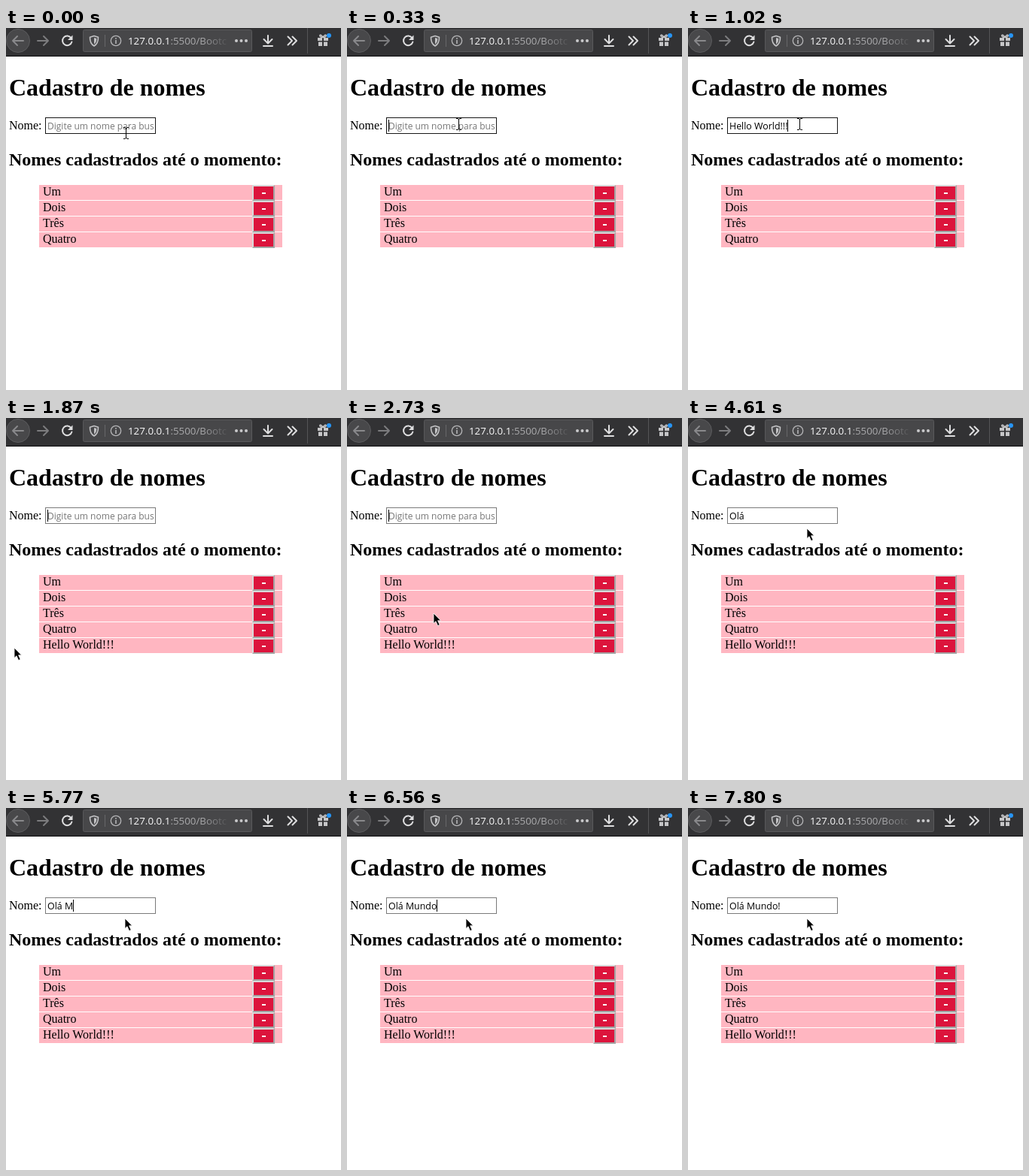
An HTML page that plays this animation: 445x482 px, repeating every 8 s.

```html
<!DOCTYPE html>
<html lang="pt">
<head>
<meta charset="utf-8">
<style>
  html, body { margin: 0; width: 100%; height: 100%; overflow: hidden; background: #fff; }
  svg { display: block; width: 445px; height: 482px; }
  text { white-space: pre; }
  .page { font-family: "Liberation Serif", "Times New Roman", serif; font-size: 16px; }
  .ui { font-family: "Open Sans", "Noto Sans", sans-serif; }
  .line { fill: none; stroke-width: 2; stroke-linecap: round; stroke-linejoin: round; }
</style>
</head>
<body>
<svg viewBox="0 0 445 482">
  <defs>
    <linearGradient id="fade" gradientUnits="userSpaceOnUse" x1="262" x2="297" y1="0" y2="0">
      <stop stop-color="#a9a9ab"/><stop offset="1" stop-color="#a9a9ab" stop-opacity="0"/>
    </linearGradient>
    <clipPath id="field"><rect x="55" y="121" width="142" height="18"/></clipPath>
  </defs>
  <rect width="445" height="482" fill="#fff"/>

  <g id="toolbar">
    <rect width="445" height="38" fill="#323234"/>
    <rect y="37" width="445" height="1" fill="#0c0c0d"/>
    <circle cx="16" cy="17" r="15.5" fill="#48484a" stroke="#5b5b5d"/>
    <path class="line" stroke="#89898b" d="M23 17H9M15 11L9 17L15 23"/>
    <path class="line" stroke="#7c7c7e" d="M42 17H56M50 11L56 17L50 23"/>
    <path class="line" stroke="#dededf" d="M86.5 13.2A6.3 6.3 0 1 0 87.4 18.5"/>
    <path fill="#dededf" d="M88.5 9.5V16H82Z"/>
    <rect x="102.5" y="2.5" width="224" height="29" rx="2" fill="#474749" stroke="#59595b"/>
    <path class="line" stroke="#c3c3c5" style="stroke-width:1.6" d="M117 10.5L122.5 12.3C122.6 18 121 21.8 117 24C113 21.8 111.4 18 111.5 12.3Z"/>
    <path fill="#c3c3c5" d="M117 13L120.3 14C120.2 18 119.2 20 117 21.5Z"/>
    <rect x="131" y="9" width="1" height="16" fill="#68686a"/>
    <circle class="line" cx="146" cy="17" r="6.7" stroke="#b5b5b7" style="stroke-width:1.3"/>
    <path fill="#b5b5b7" d="M145.2 13h1.6v1.7h-1.6zM145.2 16h1.6v5h-1.6z"/>
    <g class="ui" font-size="13.33">
      <text x="162" y="22" fill="#f9f9fa">127.0.0.1</text>
      <text x="218.4" y="22" fill="url(#fade)">:5500/Bootc</text>
    </g>
    <g fill="#c9c9cb"><circle cx="306" cy="17" r="2"/><circle cx="312.5" cy="17" r="2"/><circle cx="319" cy="17" r="2"/></g>
    <g class="line" stroke="#dededf">
      <path d="M348 10V20M342.5 15L348 20.5L353.5 15M342 24H354"/>
      <path d="M374.5 11.5L380 17L374.5 22.5M380.5 11.5L386 17L380.5 22.5"/>
    </g>
    <rect x="400" y="0" width="1" height="34" fill="#545456"/>
    <g fill="#c6c6c8">
      <path d="M414 13h6v4h-6zM422 13h6v4h-6zM415 18.5h5V24h-5zM422 18.5h5V24h-5z"/>
      <path class="line" stroke="#c6c6c8" d="M420.5 12.5C416 12 416 8.5 418.5 9.5L421 12L423.5 9.5C426 8.5 426 12 421.5 12.5" style="stroke-width:1.5"/>
    </g>
    <circle cx="429" cy="10" r="3" fill="#2795f5"/>
  </g>

  <g class="page">
    <text x="4" y="90" font-size="32" font-weight="bold">Cadastro de nomes</text>
    <text x="4" y="135">Nome:</text>
    <text x="4" y="183" font-size="24" font-weight="bold">Nomes cadastrados até o momento:</text>
    <g id="list"></g>
  </g>

  <rect id="border" x="52.5" y="119.5" width="146" height="21" fill="#fff"/>
  <g class="ui" clip-path="url(#field)">
    <text id="hint" x="55" y="135" font-size="12" fill="#767676">Digite um nome para bus</text>
    <text id="typed" x="55" y="135" font-size="12.4"></text>
  </g>
  <rect id="caret" y="122" width="1" height="16"/>

  <path id="beam" class="line" stroke="#000" style="stroke-width:1;stroke-linecap:butt"
        d="M-3 -7.5H-1L.5 -6.5L2 -7.5H4M.5 -7V7M-3 7.5H-1L.5 6.5L2 7.5H4"/>
  <path id="arrow" stroke="#fff" stroke-width=".8"
        d="M0 0V13.5L3 10.7L5.6 16.6L8.2 15.4L5.6 9.8H9.6Z"/>
</svg>
<script>
const LOOP = 8000;
const ADDED_AT = 1100;
const $ = id => document.getElementById(id);

// [time, field text, caret visible]
const typing = [
  [0, "", false], [330, "", true], [480, "H", true], [640, "Hello ", true],
  [720, "Hello World", false], [950, "Hello World!", true], [1020, "Hello World!!!", true],
  [ADDED_AT, "", true], [2960, "Hello World!!!", true], [3120, "Hello World!!!", false],
  [3270, "Hello World!!", true], [3510, "Hello World!", true], [3670, "Hello World", true],
  [3900, "Hello ", true], [3980, "", true],
  [4370, "O", true], [4450, "Ol", true], [4610, "Olá", false], [4910, "Olá ", true],
  [5070, "Olá m", false], [5150, "Olá m", true], [5540, "Olá ", true],
  [5700, "Olá M", false], [5770, "Olá M", true], [5930, "Olá Mu", true],
  [6090, "Olá Mun", true], [6170, "Olá Mund", false], [6250, "Olá Mund", true],
  [6560, "Olá Mundo", true], [6800, "Olá Mundo", false], [7260, "Olá Mundo", true],
  [7480, "Olá Mundo!", true], [7800, "Olá Mundo!", false]
];

// [time, x, y] of the pointer hotspot
const pointer = [
  [0, 159, 140], [80, 157, 130], [160, 152, 114], [240, 148, 126], [330, 148, 128],
  [1560, 138, 150], [1640, 95, 215], [1720, 45, 275], [1790, 18, 302], [1870, 11, 306],
  [1950, 4, 309], [2030, 1, 309], [2110, 40, 306], [2190, 80, 303], [2270, 100, 302],
  [2730, 115, 260], [2810, 142, 195], [2880, 158, 147]
];

const at = (steps, t) => steps.findLast(step => step[0] <= t);
const show = (id, on) => $(id).setAttribute("visibility", on ? "visible" : "hidden");

function row(name, i) {
  const y = 209 + 21 * i;
  return `<g id="row${i}">
    <rect x="44" y="${y}" width="323" height="20" fill="#ffb6c1"/>
    <text x="49" y="${y + 14}">${name}</text>
    <path fill="#d9d9d9" d="M327 ${y}h30l-2 2h-26v17l-2 2z"/>
    <path fill="#a3a3a3" d="M357 ${y}v21h-30l2 -2h26v-17z"/>
    <rect x="329" y="${y + 2}" width="26" height="17" fill="#dc143c"/>
    <rect x="340" y="${y + 10}" width="5" height="2" fill="#fff"/>
  </g>`;
}
$("list").innerHTML = ["Um", "Dois", "Três", "Quatro", "Hello World!!!"].map(row).join("");

function draw(t) {
  const [, text, caretOn] = at(typing, t);
  const [, x, y] = at(pointer, t);
  const hover = x >= 52 && x < 199 && y >= 119 && y < 141;

  $("typed").textContent = text;
  show("hint", !text);
  $("caret").setAttribute("x", 55 + Math.round(text ? $("typed").getComputedTextLength() : 0));
  show("caret", caretOn);
  $("border").setAttribute("stroke", hover ? "#171717" : "#7a7a7a");
  show("row4", t >= ADDED_AT);

  for (const id of ["beam", "arrow"]) $(id).setAttribute("transform", `translate(${x} ${y})`);
  show("beam", hover);
  show("arrow", !hover);
}

const start = performance.now();
function tick() {
  draw((performance.now() - start) % LOOP);
  requestAnimationFrame(tick);
}
tick();
</script>
</body>
</html>
```
